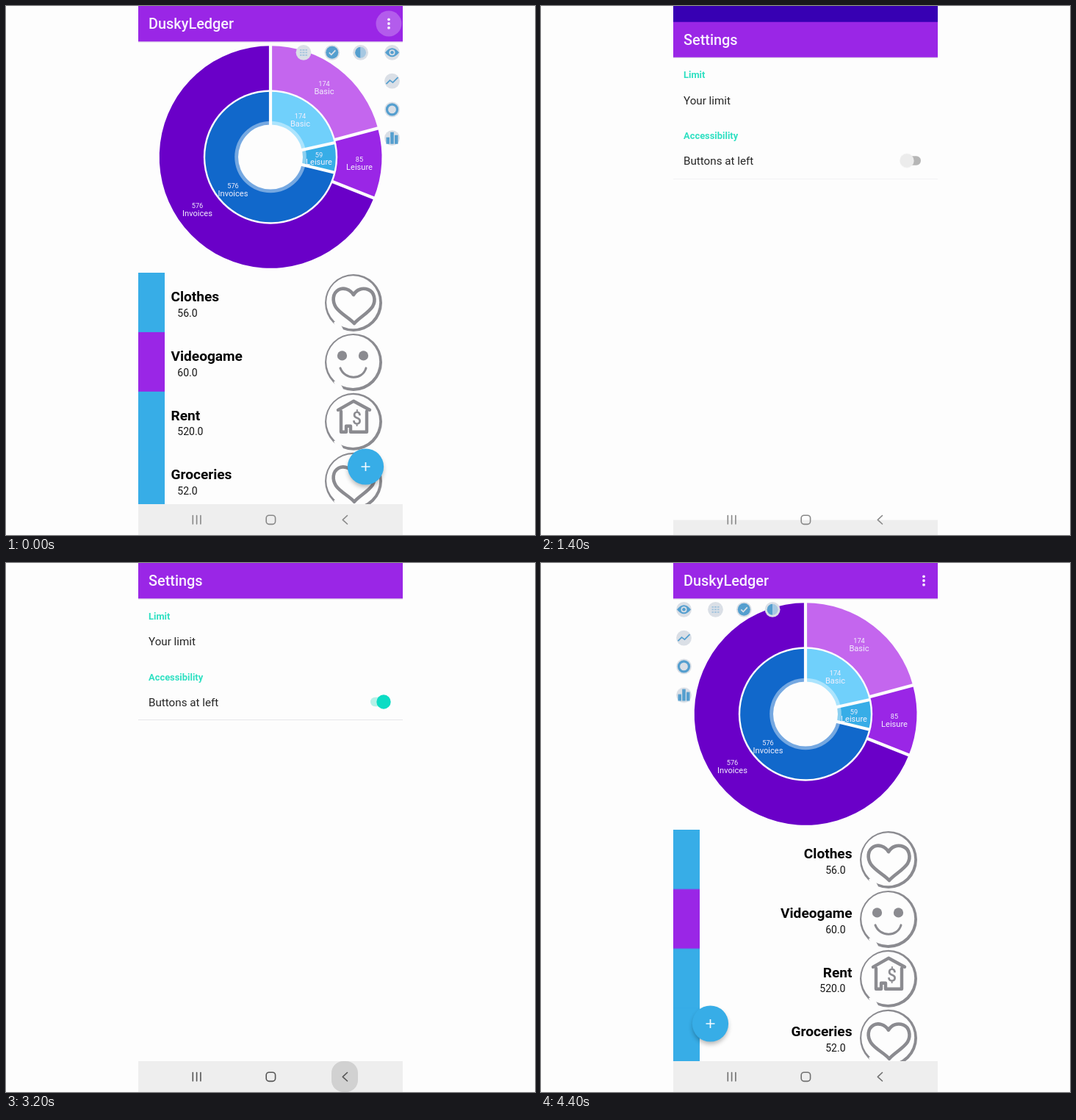
These frames come from a looping animation (720 px wide and 720 px high, 4430 ms). An HTML page:

```html
<!DOCTYPE html>
<html lang="en">
<head>
<meta charset="utf-8">
<title>Budget app</title>
<style>
html, body { margin: 0; width: 100%; height: 100%; overflow: hidden; background: #fdfdfd; }
svg { position: absolute; inset: 0; width: 360px; height: 720px; }
text { font-family: Roboto, Arial, sans-serif; }
.phone, .layer { position: absolute; width: 360px; height: 720px; overflow: hidden; }
.phone { left: 180px; top: 0; background: #000; }
.layer { left: 0; top: 0; }
.phone * { animation-duration: 4430ms; animation-iteration-count: infinite; animation-timing-function: linear; }

.bar { font-size: 19.9px; font-weight: 500; fill: #f8f0fe; }
.name { font-size: 19.1px; font-weight: 700; fill: #040404; }
.sum { font-size: 14px; fill: #161616; }
.num { font-size: 9.2px; fill: #f2effc; text-anchor: middle; }
.tag { font-size: 11.1px; fill: #f2effc; text-anchor: middle; }
.head { font-size: 12.9px; font-weight: 700; fill: #2fe0c2; }
.opt { font-size: 15.2px; fill: #262626; }
.end { text-anchor: end; }
.ink { fill: none; stroke: #8b8b90; stroke-linecap: round; stroke-linejoin: round; }

.main { animation-name: main; }
@keyframes main {
  0%, 24.83% { transform: none; animation-timing-function: cubic-bezier(.4, 0, .2, 1); }
  34.4%, 76.52% { transform: translateY(-14.4px); animation-timing-function: cubic-bezier(.4, 0, .2, 1); }
  86.12%, 100% { transform: none; }
}
.before { animation-name: before; }
@keyframes before { 0%, 60% { visibility: visible; } 60.01%, 100% { visibility: hidden; } }
.after { animation-name: after; }
@keyframes after { 0%, 60% { visibility: hidden; } 60.01%, 100% { visibility: visible; } }

.settings { animation-name: settings; }
@keyframes settings {
  0%, 24.82% { visibility: hidden; clip-path: inset(96% 0 0 0); transform: translateY(29.5px); }
  24.83% { visibility: visible; clip-path: inset(96% 0 0 0); transform: translateY(29.5px); animation-timing-function: cubic-bezier(.16, .8, .2, 1); }
  31.4%, 73.81% { visibility: visible; clip-path: inset(0); transform: none; animation-timing-function: cubic-bezier(.3, .2, .2, 1); }
  77.65% { visibility: visible; clip-path: inset(96% 0 0 0); transform: translateY(29.5px); }
  77.66%, 100% { visibility: hidden; clip-path: inset(96% 0 0 0); transform: translateY(29.5px); }
}
.sheet { animation-name: sheet; }
@keyframes sheet { 0%, 45.13% { transform: translateY(21.5px); } 45.14%, 100% { transform: none; } }

/* The popup unrolls from its top right corner and fades out as a whole */
.menu { animation-name: menu, unroll; }
@keyframes menu {
  0%, 1.4% { opacity: 0; }
  3.6%, 21.2% { opacity: 1; }
  23.9%, 100% { opacity: 0; }
}
@keyframes unroll {
  0%, 1.4% { clip-path: inset(0 0 100% 100%); animation-timing-function: cubic-bezier(.4, 0, .2, 1); }
  7%, 100% { clip-path: inset(0 0 84% 48%); }
}
.pick { animation-name: pick; }
@keyframes pick { 0%, 19% { opacity: 0; } 20.8%, 100% { opacity: 1; } }
.tap { animation-name: tap; }
@keyframes tap { 0%, 1.4% { opacity: 1; } 7%, 100% { opacity: 0; } }

.press { animation-name: press; }
@keyframes press {
  0%, 54.8% { opacity: 0; r: 121px; }
  54.81% { opacity: 1; r: 121px; }
  57.2% { opacity: 1; r: 184px; }
  62.5%, 100% { opacity: 0; r: 184px; }
}
.thumb { animation-name: thumb; }
@keyframes thumb {
  0%, 56.4% { transform: none; fill: #ececec; animation-timing-function: ease-in-out; }
  62.1%, 100% { transform: translateX(16px); fill: #0cdcc4; }
}
.track { animation-name: track; }
@keyframes track { 0%, 56.4% { fill: #b6b6b6; } 62.1%, 100% { fill: #b5f1e8; } }

.keys { fill: none; stroke-width: 1.6; stroke-linecap: round; stroke-linejoin: round; animation-name: keys; }
@keyframes keys { 0%, 67.7% { stroke: #888; } 70%, 82% { stroke: #555; } 92%, 100% { stroke: #707070; } }
.back { animation-name: back; }
@keyframes back {
  0%, 67.7% { opacity: 0; x: 451px; width: 20px; rx: 10px; }
  70%, 72.3% { opacity: .12; x: 443px; width: 36px; rx: 16px; }
  79% { opacity: .035; x: 408px; width: 107px; rx: 16px; }
  88%, 100% { opacity: 0; x: 408px; width: 107px; rx: 16px; }
}
</style>
</head>
<body>
<div class="phone">
  <div class="layer main" id="main"></div>
  <div class="layer settings" id="settings"></div>
  <div class="layer menu" id="menu"></div>
  <div class="layer" id="system"></div>
</div>
<script>
const PURPLE = '#9a26e6', SKY = '#37ade7', PAPER = '#fdfdfd', NAV = '#eee';
const BLUE = '#559fcf', PALE = '#dadfe6', GRAY = '#8b8b90';
const CX = 360, CY = 205.5, ROW = 80.9;

const text = (cls, x, y, s) => `<text class="${cls}" x="${x}" y="${y}">${s}</text>`;
const rect = (x, y, w, h, fill, more = '') => `<rect x="${x}" y="${y}" width="${w}" height="${h}" fill="${fill}" ${more}/>`;
const disc = (x, y, r, fill, more = '') => `<circle cx="${x}" cy="${y}" r="${r}" fill="${fill}" ${more}/>`;
const show = (id, body) => {
  document.getElementById(id).innerHTML = `<svg viewBox="180 0 360 720">${body}</svg>`;
};
const polar = (r, turn) => {
  const a = turn * 2 * Math.PI;
  return [CX + r * Math.sin(a), CY - r * Math.cos(a)];
};

function slices(r, parts) {
  const total = parts.reduce((sum, p) => sum + p[0], 0);
  let at = 0, fills = '', gaps = '';
  for (const [value, color] of parts) {
    const to = at + value / total;
    fills += `<path fill="${color}" d="M${CX} ${CY}L${polar(r, at)}A${r} ${r} 0 ${to - at > .5 ? 1 : 0} 1 ${polar(r, to)}z"/>`;
    gaps += `<path stroke="${PAPER}" stroke-width="4.2" d="M${CX} ${CY}L${polar(r + 1, at)}"/>`;
    at = to;
  }
  return fills + gaps;
}

const label = (x, y, value, name) => text('num', x, y, value) + text('tag', x, y + 10.7, name);

const pie =
  slices(151.3, [[174, '#c466ee'], [85, PURPLE], [576, '#6a00c8']]) + disc(CX, CY, 91.2, PAPER) +
  slices(88.8, [[174, '#70d0fb'], [59, SKY], [576, '#1168cb']]) +
  disc(CX, CY, 48.8, '#fff', 'opacity=".42"') + disc(CX, CY, 44, PAPER) +
  label(433, 109.3, 174, 'Basic') + label(400.5, 153.3, 174, 'Basic') +
  label(426, 205.5, 59, 'Leisure') + label(481, 212.3, 85, 'Leisure') +
  label(309, 248, 576, 'Invoices') + label(260.5, 275, 576, 'Invoices');

const heart = `<path class="ink" stroke-width="4.6" d="M0-11C-5-19-14-21-20-18C-29-13-29-2-24 6C-18 15-6 20 1 28C8 20 20 14 26 5C31-4 28-15 20-18C12-21 4-18 0-11z"/>`;
const smile = disc(-15.5, -9, 6.6, GRAY) + disc(13.5, -9, 6.6, GRAY) +
  `<path class="ink" stroke-width="3" d="M-18 8C-12 24 12 25 17 8"/>`;
const house = `<path class="ink" stroke-width="4.4" d="M-21-16L0-28L22-16M-17-14V14H-10V6H-4V14H18V-14"/>` +
  `<text x="4.5" y="4" font-size="23" font-weight="500" text-anchor="middle" fill="${GRAY}">$</text>`;

const rows = [
  ['Clothes', '56.0', SKY, heart],
  ['Videogame', '60.0', PURPLE, smile],
  ['Rent', '520.0', SKY, house],
  ['Groceries', '52.0', SKY, heart]
];

const badge = (y, art) => `<g transform="translate(473 ${y})">
  <path fill="${GRAY}" fill-rule="evenodd" d="M-39 0a39 39 0 1 0 78 0a39 39 0 1 0-78 0zM-36.8-.8a36 36 0 1 0 72 0a36 36 0 1 0-72 0z"/>
  <path stroke="${PAPER}" stroke-width="7" d="M-24 25L-17 38"/>${art}</g>`;

const list = rows.map(([, , color, art], i) =>
  rect(180, 363 + i * ROW, 36, 82, color) + badge(404 + i * ROW, art)).join('');

const words = right => rows.map(([name, sum], i) => {
  const y = 363 + i * ROW, end = right ? ' end' : '';
  return text('name' + end, right ? 423.5 : 224.5, y + 38.7, name) +
    text('sum' + end, right ? 414.5 : 233.3, y + 59.6, sum);
}).join('');

const line = (d, w = 1.8, color = BLUE) => `<path fill="none" stroke="${color}" stroke-width="${w}" d="${d}"/>`;
const glyphs = {
  grid: line('M-5-3.5H5M-5 0H5M-5 3.5H5', 1.8, '#a3c4de') + line('M-2-6V6M2-6V6', 1, PALE),
  check: disc(0, 0, 8.5, BLUE) + line('M-4 0L-1 3L4.5-3', 1.8, PALE),
  half: `<path fill="${BLUE}" d="M0-7.5A7.5 7.5 0 0 0 0 7.5z"/><path fill="#a6c8e2" d="M0-7.5A7.5 7.5 0 0 1 0 7.5z"/>`,
  eye: `<path fill="${BLUE}" d="M-9.5 0Q0-12 9.5 0Q0 12-9.5 0z"/>` + disc(0, 0, 4, PALE) + disc(0, 0, 2.3, BLUE),
  trend: line('M-8 4L-3-1L1 2L8-5'),
  ring: `<circle r="7" fill="none" stroke="${BLUE}" stroke-width="3.2"/>`,
  bars: `<path fill="${BLUE}" d="M-8-1h4.5v9h-4.5zM-2.3-8h4.6v16h-4.6zM3.5-4h4.5v12h-4.5z"/>`
};
const button = (x, y, kind) => `<g transform="translate(${x} ${y})">${disc(0, 0, 10.4, PALE)}${glyphs[kind]}</g>`;

// Floating buttons for one hand: the column x, the row start and the add button
const controls = (col, row, add) =>
  ['grid', 'check', 'half'].map((k, i) => button(row + i * 38.8, 63.3, k)).join('') +
  ['eye', 'trend', 'ring', 'bars'].map((k, i) => button(col, 63.3 + i * 38.8, k)).join('') +
  disc(add, 631, 24, '#000', 'opacity=".28" filter="url(#soft)"') + disc(add, 627, 24.6, SKY) +
  line(`M${add - 6} 627h12M${add} 621v12`, 1.7, '#f4faff');

const blur = '<filter id="soft" x="-30%" y="-30%" width="160%" height="160%"><feGaussianBlur stdDeviation="3"/></filter>';
const bar = title => rect(180, 48, 360, 1.5, '#dfd6e6') + rect(180, 0, 360, 48.3, PURPLE) + text('bar', 194, 31.4, title);

show('main', blur + rect(180, 0, 360, 720, PAPER) + bar('DuskyLedger') +
  disc(521, 24, 17.5, '#fff', 'class="tap" fill-opacity=".25"') +
  [18.3, 24, 29.7].map(y => disc(521, y, 1.9, '#f8f0fe')).join('') +
  pie + list +
  `<g class="before">${words(false)}${controls(525.5, 405, 489.5)}</g>` +
  `<g class="after">${words(true)}${controls(194.5, 237.5, 230.5)}</g>` +
  rect(180, 678, 360, 42, NAV));

show('settings', '<clipPath id="row"><rect x="180" y="165" width="360" height="48.5"/></clipPath>' +
  rect(180, 0, 360, 720, PAPER) + rect(180, 0, 360, 22, '#3700b3') +
  `<g class="sheet">${bar('Settings')}` +
  `<g clip-path="url(#row)">${disc(360, 189, 121, '#e6e6e6', 'class="press"')}</g>` +
  text('head', 194, 76.8, 'Limit') + text('opt', 194, 112, 'Your limit') +
  text('head', 194, 159.8, 'Accessibility') + text('opt', 194, 194.8, 'Buttons at left') +
  rect(496, 182.8, 21, 12.4, '#b6b6b6', 'rx="6.2" class="track"') +
  disc(498, 189, 9.7, '#ececec', 'class="thumb"') +
  rect(180, 213, 360, 1, '#e6e6ea') + rect(180, 678, 360, 42, NAV) + '</g>');

show('menu', rect(366, 6, 171, 97, '#000', 'rx="4" opacity=".28" filter="url(#soft)"') +
  rect(365, 3, 172, 98, PAPER, 'rx="3.5"') +
  rect(365, 53, 172, 42, '#e6e6e6', 'class="pick"') +
  text('opt', 379.3, 37.4, 'Log out') + text('opt', 379.3, 79.4, 'Settings'));

show('system', rect(443, 678, 36, 42, '#000', 'class="back"') +
  `<g class="keys"><path d="M254.3 693.5v11.5M259.6 693.5v11.5M264.9 693.5v11.5M464.5 693.5L458.3 699.3L464.5 705"/>
  <rect x="354.2" y="693.2" width="12.4" height="12.2" rx="3.8"/></g>`);
</script>
</body>
</html>
```
